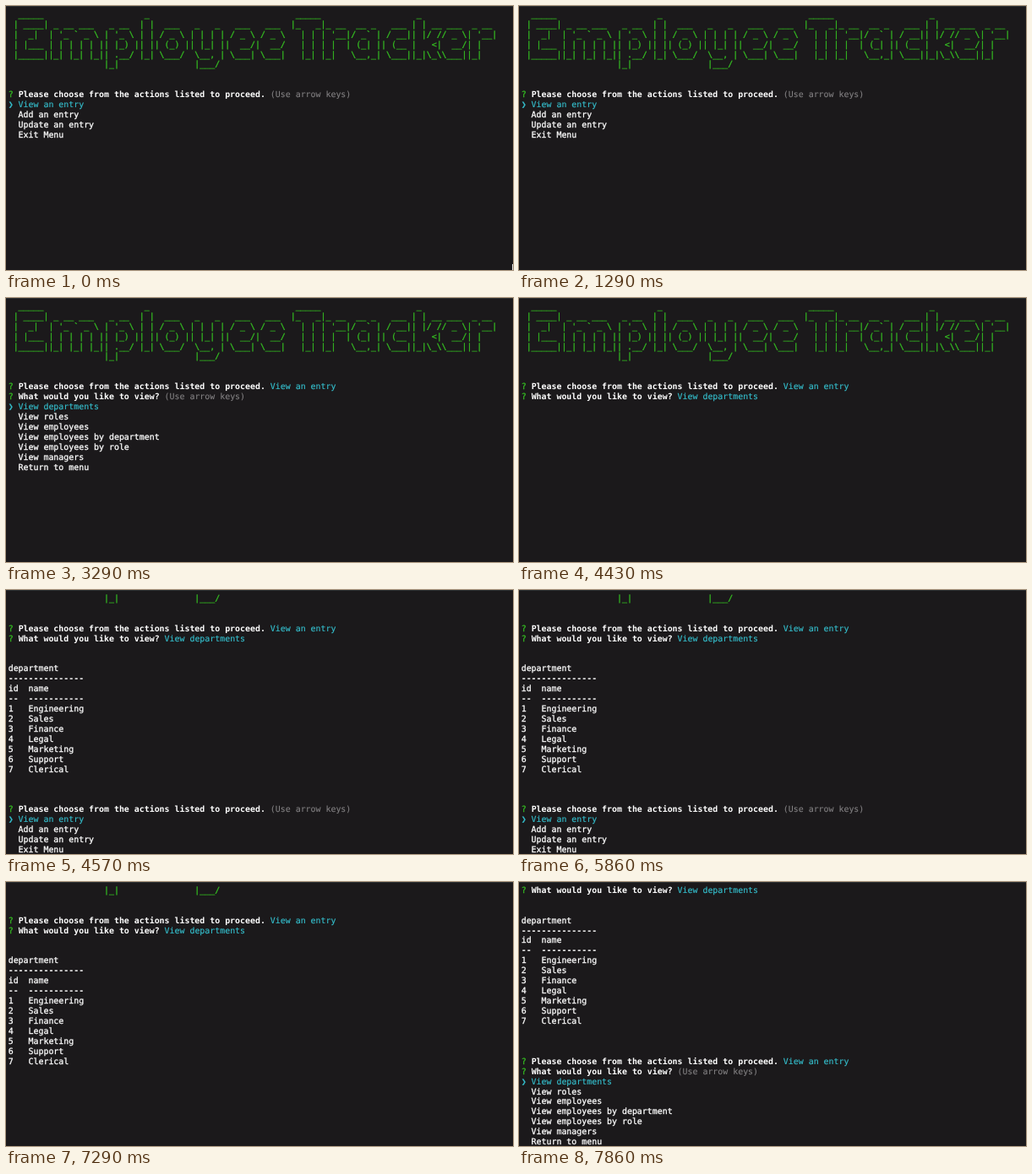
Animation of 600 by 313 pixels, one loop 8000 ms. Source, as an HTML page:

```html
<!DOCTYPE html>
<html lang="en">
<head>
<meta charset="utf-8">
<style>
  html, body { margin: 0; width: 100%; height: 100%; overflow: hidden; background: #1b191b; }
  pre {
    position: absolute; left: 2.7px; top: 4.8px; margin: 0; color: #fff;
    font: 9.92px/11.94px "DejaVu Sans Mono", monospace; text-rendering: geometricPrecision;
    -webkit-text-stroke: .3px;
  }
  b { -webkit-text-stroke: 0; }
  #banner { display: none; }
  .green { color: #35bd22; }
  .cyan { color: #35bfcd; -webkit-text-stroke: .15px; }
  .dim { color: #838183; -webkit-text-stroke: .1px; }
  .pointer { position: absolute; }
  #bar { position: absolute; inset: 0 0 auto; height: 1px; background: #2b2f31; }
  #mark { position: absolute; right: 0; bottom: 0; width: 1px; height: 7px; background: #ddd; }
</style>
</head>
<body>
<pre id="banner">  _____                    _                             _____                   _
 | ____| _ __ ___   _ __  | |  ___   _   _   ___   ___  |_   _|_ __  __ _   ___ | | __ ___  _ __
 |  _|  | '_ ` _ \ | '_ \ | | / _ \ | | | | / _ \ / _ \   | | | '__|/ _` | / __|| |/ // _ \| '__|
 | |___ | | | | | || |_) || || (_) || |_| ||  __/|  __/   | | | |  | (_| || (__ |   &lt;|  __/| |
 |_____||_| |_| |_|| .__/ |_| \___/  \__, | \___| \___|   |_| |_|   \__,_| \___||_|\_\\___||_|
                   |_|               |___/</pre>
<pre id="screen"></pre>
<div id="bar"></div>
<div id="mark"></div>
<script>
const ROWS = 26, LOOP = 8000;
const screen = document.getElementById('screen');
const mark = document.getElementById('mark');
const paint = (color, text) => `<span class="${color}">${text}</span>`;

const question = (text, tail) => `${paint('green', '?')} <b>${text}</b> ${tail}`;
const answered = (text, answer) => [question(text, paint('cyan', answer))];
const menu = (text, [first, ...rest]) => [
  question(text, paint('dim', '(Use arrow keys)')),
  paint('cyan', `<span class="pointer">❯</span>  ${first}`),
  ...rest.map(item => '  ' + item)
];

const ACTION = 'Please choose from the actions listed to proceed.';
const VIEW = 'What would you like to view?';
const actions = menu(ACTION, ['View an entry', 'Add an entry', 'Update an entry', 'Exit Menu']);
const views = menu(VIEW, ['View departments', 'View roles', 'View employees',
  'View employees by department', 'View employees by role', 'View managers', 'Return to menu']);
const actionDone = answered(ACTION, 'View an entry');
const viewDone = answered(VIEW, 'View departments');

const departments = ['Engineering', 'Sales', 'Finance', 'Legal', 'Marketing', 'Support', 'Clerical'];
const rule = n => `<b>${'-'.repeat(n)}</b>`;
const table = ['department', rule(15), 'id  name', `${rule(2)}  ${rule(11)}`,
  ...departments.map((name, i) => `${i + 1}   ${name}`)];

const blank = n => Array(n).fill('');
const banner = document.getElementById('banner').innerHTML.split('\n').map(line => paint('green', line));
const start = [...banner, ...blank(2)];
const chosen = [...start, ...actionDone, ...viewDone];
const listed = [...chosen, ...blank(2), ...table, ...blank(3)];

// [start time, whole terminal history]; only the last ROWS lines are visible
const states = [
  [0, [...start, ...actions]],
  [1710, [...start, ...actionDone, ...views]],
  [4430, chosen],
  [4570, [...listed, ...actions]],
  [7290, [...listed, ...blank(5)]],
  [7430, [...listed, ...actionDone, ...views]]
];

let shown;
function draw() {
  const t = performance.now() % LOOP;
  const state = states.findLast(([from]) => t >= from);
  if (state !== shown) {
    screen.innerHTML = state[1].slice(-ROWS).join('\n');
    shown = state;
  }
  mark.hidden = t >= 140;
  requestAnimationFrame(draw);
}
draw();
</script>
</body>
</html>
```
